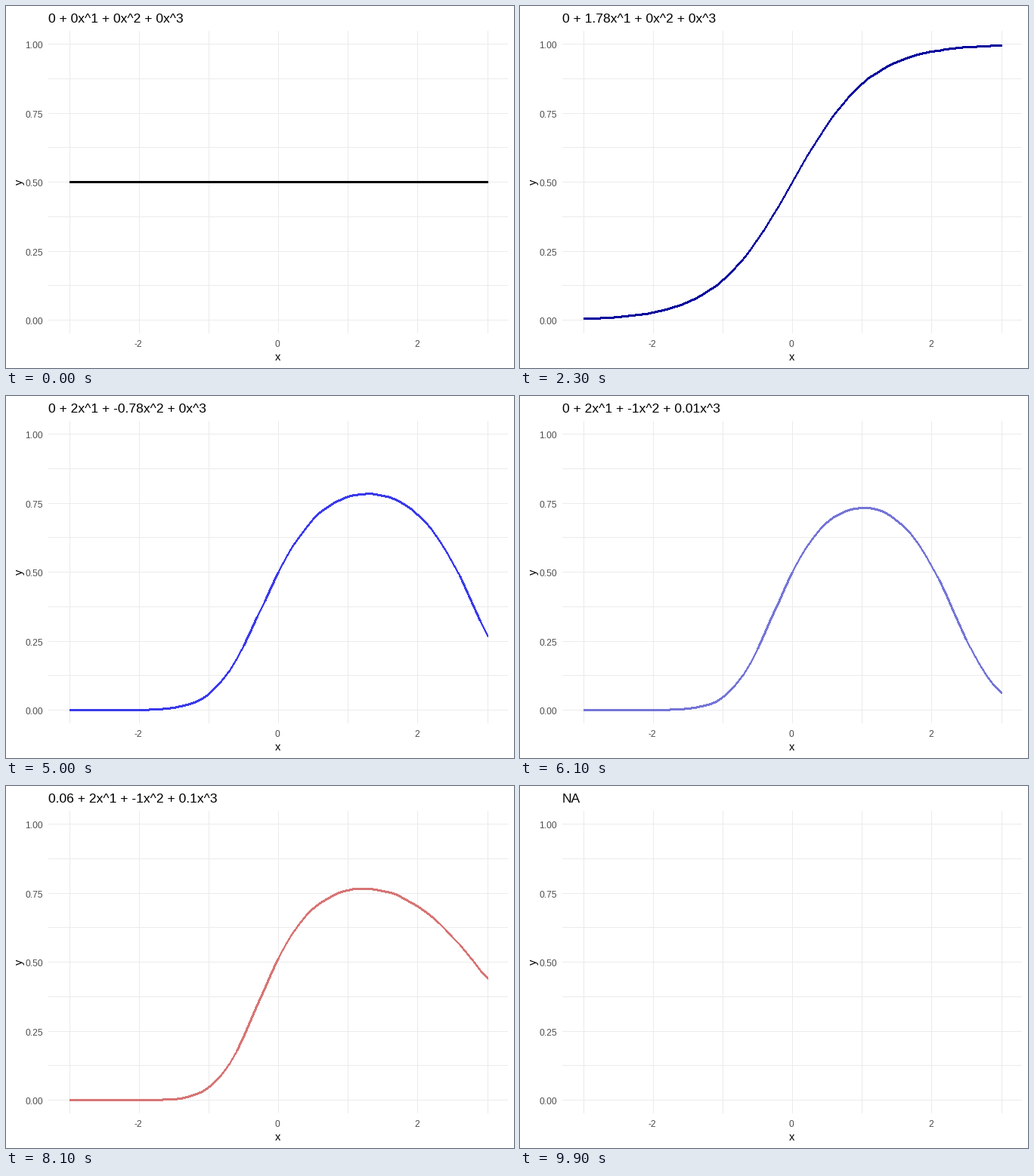
A matplotlib script that plays this animation: 672 px wide and 480 px high, repeating every 10000 ms.

```python
import matplotlib.pyplot as plt
import numpy as np
from matplotlib.animation import FuncAnimation
from matplotlib.collections import PolyCollection
from matplotlib.colors import to_rgb

W, H, DPI = 672, 480, 96
PT = 72 / DPI
STEPS = 9
ENDS = {1: 2.0, 2: -1.0, 3: 0.1, 0: 0.5}   # final coefficients, in order of change
RAMP = [to_rgb(c) for c in ("#000000", "#0000ff", "#bebebe", "#ff0000")]
STATES = len(ENDS) * (STEPS + 1)

plt.rcParams["font.family"] = "Liberation Sans"
fig = plt.figure(figsize=(W / DPI, H / DPI), dpi=DPI, facecolor="white")
ax = fig.add_axes([0, 0, 1, 1])
ax.set_xlim(0, W)
ax.set_ylim(H, 0)
ax.axis("off")


def px(x):
    """Whole pixel column of a data value."""
    return np.floor(360.55 + 92.16 * x)


def py(y):
    """Whole pixel row of a data value."""
    return np.floor(416.6 - 366 * y)


def label(x, y, s, size, color="black", **kw):
    return ax.text(x, y, s, fontsize=size, color=color, **kw)


def draw_grid():
    style = dict(color="#ebebeb", lw=PT, antialiased=False,
                 solid_capstyle="butt", snap=False, zorder=1)
    for x in range(-3, 4):
        ax.plot([px(x) + 0.5] * 2, [33, 434], **style)
    for y in np.arange(9) / 8:
        ax.plot([56, 664], [py(y) + 0.5] * 2, **style)


def draw_labels():
    grey = "#4d4d4d"
    for y in np.arange(5) / 4:
        label(49, py(y) + 6, f"{y:.2f}", 9, grey, ha="right", va="baseline")
    for x in (-2, 0, 2):
        label(px(x) - 0.7, 452, str(x), 9, grey, ha="center", va="baseline")
    label(359.3, 470, "x", 11, ha="center", va="baseline")
    label(24.7, 233, "y", 11, rotation=90, ha="right", va="center")


def state_at(frame):
    """Three frames per state in the first half, two in the second."""
    return (frame + 1) // 3 if frame < 59 else 20 + (frame - 59) // 2


def coefs(state):
    group, step = divmod(state, STEPS + 1)
    out = np.zeros(4)
    for i, (power, end) in enumerate(ENDS.items()):
        if i < group:
            out[power] = end
        elif i == group:
            out[power] = end * step / STEPS
    return out


def ramp_color(state):
    pos = state / (STATES - 1) * (len(RAMP) - 1)
    return [np.interp(pos, range(len(RAMP)), ch) for ch in zip(*RAMP)]


def formula(b):
    nums = [f"{round(v, 2) + 0:g}" for v in b]
    return " + ".join([nums[0]] + [f"{nums[p]}x^{p}" for p in (1, 2, 3)])


def band(pts, shift):
    """Outline of a line swept by a pen from -shift to +shift."""
    return np.vstack([pts - shift, (pts + shift)[::-1]])


def pen_stroke(x, y):
    """Two-pixel pen: upright along the curve, sideways on steep pieces."""
    pts = np.column_stack([x, y])
    dx, dy = np.abs(np.diff(pts, axis=0)).T
    steep = np.flatnonzero(dy > 2 * dx)
    shapes = [band(pts, [0, 1])] + [band(pts[i:i + 2], [1, 0]) for i in steep]
    return [s + 0.45 for s in shapes]


draw_grid()
draw_labels()
title = label(56, 22, "", 13.1, ha="left", va="baseline")
curve = ax.add_collection(PolyCollection([], linewidths=0, edgecolors="none",
                                         antialiaseds=False, snap=False, zorder=2),
                          autolim=False)
xs = np.linspace(-3, 3, 61)


def update(frame):
    state = state_at(frame)
    if state >= STATES:
        title.set_text("NA")
        curve.set_verts([])
    else:
        b = coefs(state)
        y = 1 / (1 + np.exp(-np.polyval(b[::-1], xs)))
        title.set_text(formula(b))
        curve.set_verts(pen_stroke(px(xs), py(y)))
        curve.set_facecolor(ramp_color(state))
    return title, curve


anim = FuncAnimation(fig, update, frames=100, interval=100,
                     init_func=lambda: update(0), repeat=True,
                     repeat_delay=0, blit=False)
plt.show()
```
